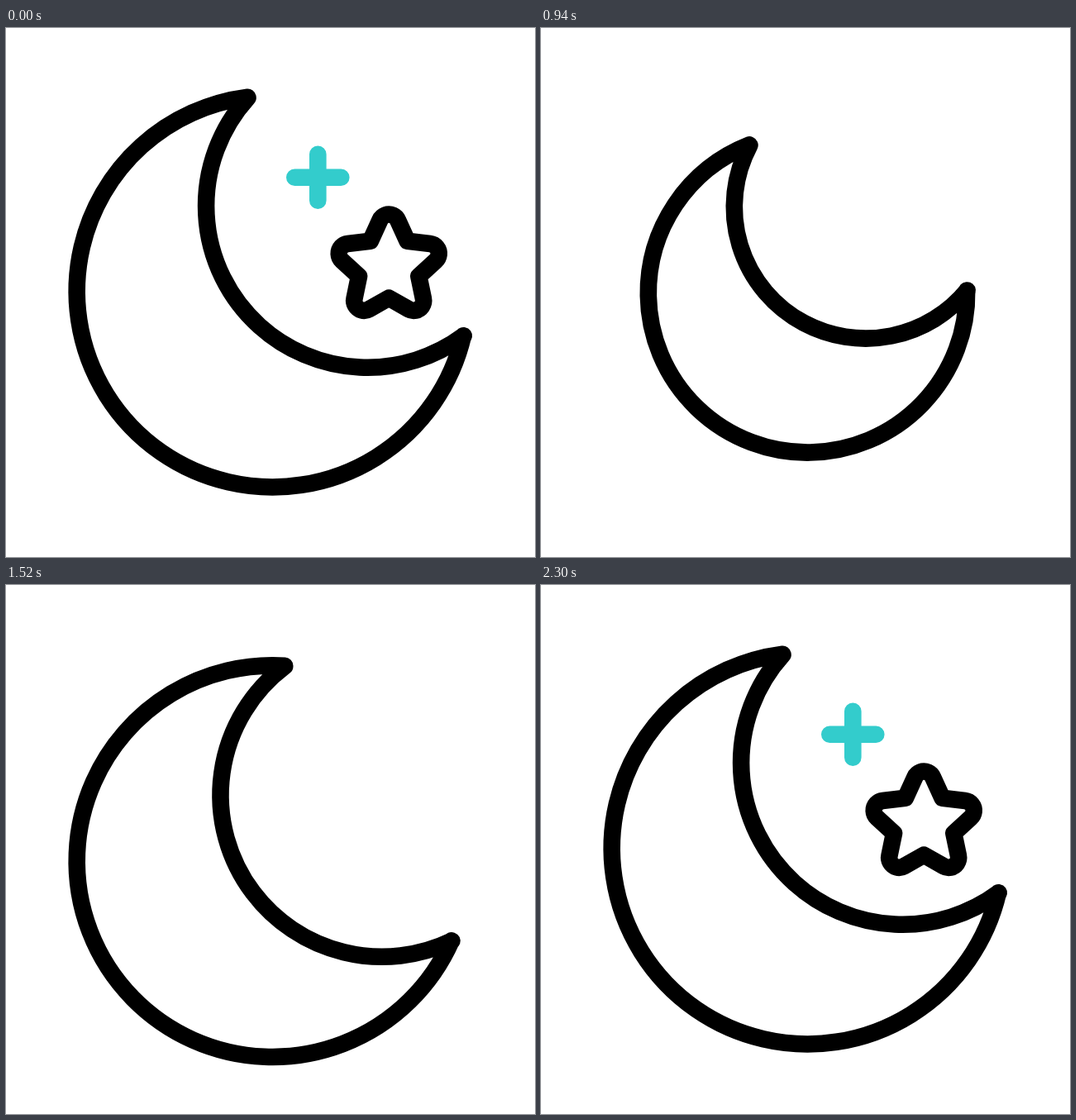
An HTML page with a canvas for the animation above (2400 ms loop, 640x640 px).

```html
<!DOCTYPE html>
<html lang="en">
<head>
<meta charset="utf-8">
<title>Moon and star</title>
<style>
  html, body { margin: 0; width: 100%; height: 100%; overflow: hidden; background: #fff; }
  canvas { display: block; width: 100vmin; height: 100vmin; }
</style>
</head>
<body>
<canvas id="stage" width="640" height="640"></canvas>
<script>
const ctx = document.getElementById('stage').getContext('2d');
const LOOP = 2400, STEP = 20;
const rad = d => d * Math.PI / 180;

// Eased progress from a to b
function ease(t, a, b) {
  const u = Math.min(1, Math.max(0, (t - a) / (b - a)));
  return u * u * (3 - 2 * u);
}

// Keys are [time, value] pairs, eased between neighbours
function track(t, keys) {
  let v = keys[0][1];
  for (let i = 1; i < keys.length; i++) {
    const [t0, v0] = keys[i - 1], [t1, v1] = keys[i];
    if (t >= t0) v = v0 + (v1 - v0) * ease(t, t0, t1);
  }
  return v;
}

function curve(a, c, b, s) {
  const q = 1 - s;
  return [0, 1].map(i => q * q * a[i] + 2 * q * s * c[i] + s * s * b[i]);
}

// Builds a path in local space, then strokes it with an unscaled pen
function shape(x, y, turn, size, color, build, fill) {
  ctx.save();
  ctx.translate(x, y);
  ctx.rotate(rad(turn));
  ctx.scale(size, size);
  ctx.beginPath();
  build();
  ctx.restore();
  if (fill) {
    ctx.fillStyle = fill;
    ctx.fill();
  }
  ctx.strokeStyle = color;
  ctx.stroke();
}

function moonPath() {
  ctx.arc(0, 0, 236.8, rad(13.1), rad(262.7));
  ctx.arc(115, -103.3, 195.4, rad(222.1), rad(53.5), true);
  ctx.closePath();
}

function starPath() {
  for (let i = 0; i < 5; i++) {
    const a = rad(i * 72 - 90), n = a + rad(36), bend = rad(65.6);
    ctx.arc(51 * Math.cos(a), 51 * Math.sin(a), 12, a - bend, a + bend);
    ctx.lineTo(38 * Math.cos(n), 38 * Math.sin(n));
  }
  ctx.closePath();
}

function plusPath() {
  ctx.moveTo(-28, 0);
  ctx.lineTo(28, 0);
  ctx.moveTo(0, -28);
  ctx.lineTo(0, 28);
}

const plusHome = [377.3, 180.8], starHome = [463.2, 288.6];
const starDen = [243.5, 445.3], starBend = [331.8, 308.3];

function drawPlus(t) {
  if (t > 720 && t < 1560) return;
  const leaving = t < 1000;
  const s = leaving ? ease(t, 350, 870) : ease(t, 1500, 2016);
  const [x, y] = leaving
    ? curve(plusHome, [270.9, 310.4], [190, 430], s)
    : curve([225, 365], [275, 245], plusHome, s);
  shape(x, y, leaving ? -180 * s : 180 * (s - 1), 1, '#33cccc', plusPath);
}

function drawStar(t) {
  if (t > 700 && t < 1580) return;
  const s = t < 1000 ? 1 - ease(t, 200, 700) : ease(t, 1580, 2200);
  const [x, y] = curve(starDen, starBend, starHome, s);
  const size = track(t, [[200, 1], [400, 1.35], [700, 0.58], [1600, 0.58], [2000, 1.35], [2300, 1]]);
  shape(x, y, 180 * (s - 1), size, '#000', starPath);
}

function drawMoon(t) {
  const y = track(t, [[200, 318.6], [700, 356.6], [1200, 280.6], [1700, 356.6], [2200, 318.6]]);
  const size = track(t, [[200, 1], [800, 0.784], [1400, 1]]);
  const turn = track(t, [[200, 0], [800, -18.9], [1400, 16], [1800, -7.8], [2200, 0]]);
  shape(322.5, y, turn, size, '#000', moonPath, '#fff');
}

function draw(t) {
  ctx.fillStyle = '#fff';
  ctx.fillRect(0, 0, 640, 640);
  ctx.lineWidth = 20.6;
  ctx.lineCap = ctx.lineJoin = 'round';
  drawPlus(t);
  drawStar(t);
  drawMoon(t);
}

const start = performance.now();
function tick() {
  const t = (performance.now() - start) % LOOP;
  draw(Math.floor(t / STEP) * STEP);
  requestAnimationFrame(tick);
}
tick();
</script>
</body>
</html>
```
